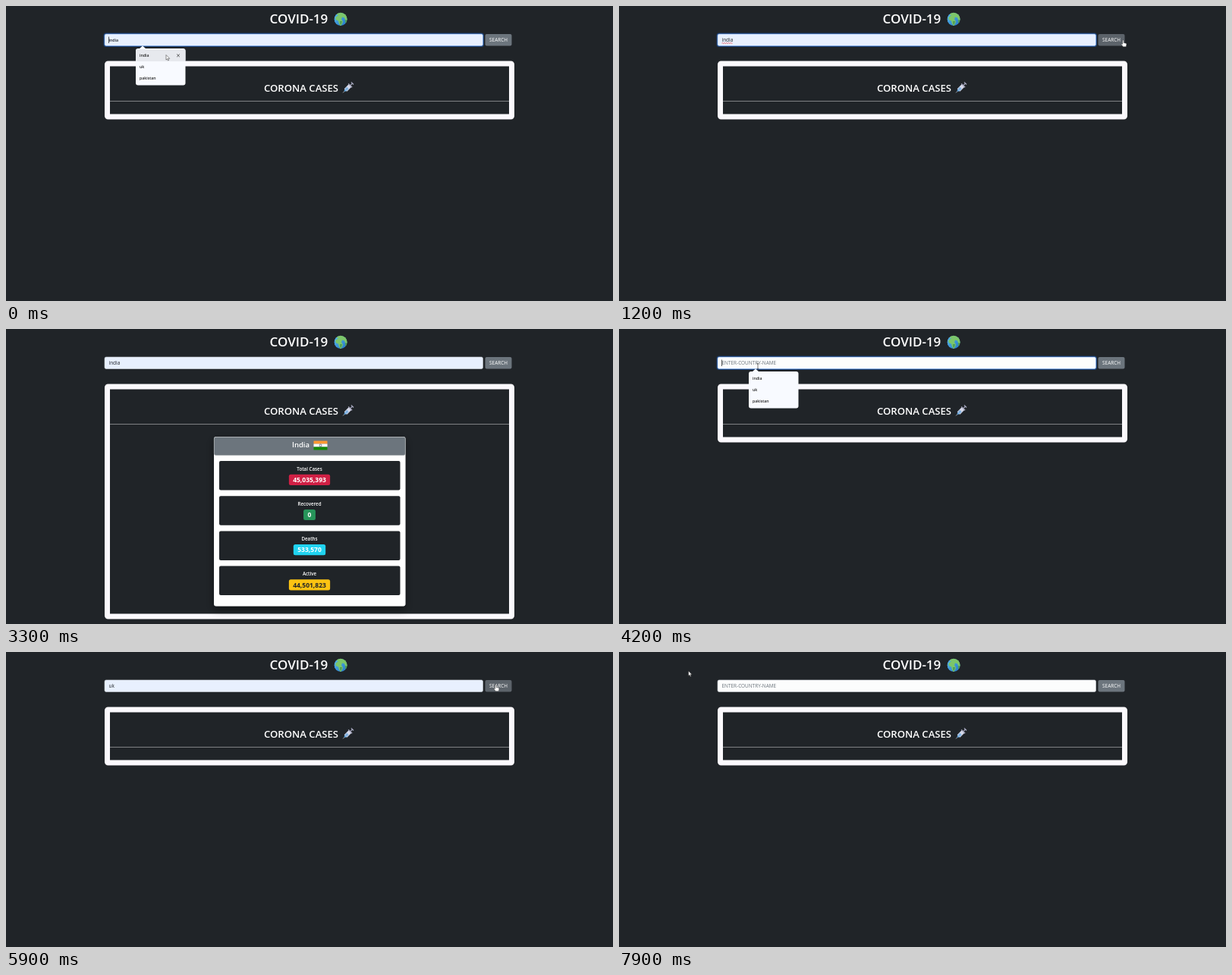
An HTML page for the animation above (8 s loop, 800 px wide and 389 px high).

```html
<!DOCTYPE html>
<html lang="en">
<head>
<meta charset="utf-8">
<title>COVID-19</title>
<style>
  html, body { margin: 0; width: 100%; height: 100%; overflow: hidden; background: #202428; }
  svg { display: block; width: 100%; height: 100%; }
  text { font-family: "Open Sans", "Noto Sans", sans-serif; white-space: pre; }
  .mid { text-anchor: middle; }
  .semi { font-weight: 600; }
  .off { display: none; }
</style>
</head>
<body>
<svg viewBox="0 0 800 389" fill="#fff">
  <defs>
    <filter id="shadow" x="-15%" y="-15%" width="130%" height="130%">
      <feDropShadow dx="0" dy="4" stdDeviation="6" flood-color="#000" flood-opacity=".45"/>
    </filter>
    <linearGradient id="sea" x2="1" y2="1">
      <stop stop-color="#58b8f0"/><stop offset="1" stop-color="#2478c4"/>
    </linearGradient>
    <clipPath id="disc"><circle cx="441" cy="17.3" r="8.6"/></clipPath>
    <clipPath id="jack"><rect width="16.5" height="8.6"/></clipPath>
  </defs>

  <text class="semi" x="347.5" y="23" font-size="17">COVID-19</text>
  <g clip-path="url(#disc)">
    <circle cx="441" cy="17.3" r="8.6" fill="url(#sea)"/>
    <path fill="#7cc66a" d="M436 9l6-1.5 6 2 3 5-1 6-3-2-1-3-3-1-1 3 2 3-1 3-2 3-2-3-1-4-3-1-1-3 2-2 2-1-2-1z"/>
    <path fill="#4d9c57" d="M440 20l3 0-1 4-1.500 1zM447 18l3 1-1 4-2-1z"/>
  </g>

  <rect id="ring" x="128.5" y="35.500" width="501.500" height="18.500" rx="3.500" fill="#1d3f70"/>
  <rect id="field" x="130" y="37" width="498.500" height="15.500" rx="2" stroke-width=".6"/>
  <text id="value" x="135.500" y="47.200"></text>
  <path id="spell" fill="none" stroke="#e33" stroke-width=".7" d="M135.500 49q.7-1.100 1.400 0t1.400 0 1.400 0 1.400 0 1.400 0 1.400 0 1.400 0 1.400 0 1.400 0 1.400 0"/>
  <rect id="caret" x="135" y="40.500" width=".7" height="8.500" fill="#111"/>
  <rect id="button" x="631.500" y="37" width="35" height="15.500" rx="2"/>
  <text class="mid" x="649" y="47.100" font-size="6.400">SEARCH</text>

  <rect id="panel" x="133.500" y="76" width="533" rx="1" fill="none" stroke="#fbf9fd" stroke-width="7"/>
  <text class="semi" x="340" y="112.800" font-size="13.100">CORONA CASES</text>
  <g transform="translate(450.500 108) rotate(-45)">
    <path d="M-9 0H-4" stroke="#a9b6c4" stroke-width=".9"/>
    <path fill="#4f9fe0" d="M-6-1.200h2.500v2.400h-2.500z"/>
    <rect x="-4.500" y="-2.600" width="9" height="5.200" rx="1" fill="#d5d8e8"/>
    <rect x="-4" y="-1.700" width="4" height="3.400" fill="#7fb2e2"/>
    <path stroke="#a8a9c0" stroke-width="1.200" d="M4.500-3.500v7M4.500 0h4M8.500-2.200v4.400"/>
  </g>
  <rect x="137" y="125" width="526" height=".8" fill="#97999b"/>

  <g id="cards"></g>

  <g id="menu">
    <path fill="#f8faff" d="M175.500 56.500l4.500-4 4.500 4z"/>
    <rect x="171" y="56" width="65.500" height="48.500" rx="3" fill="#f8faff"/>
    <rect id="hover" x="171" width="65.500" height="16" rx="2" fill="#e7e9ee"/>
    <path id="cross" stroke="#333" stroke-width=".8" d="M225.200 63.500l3.600 3.600m0-3.600l-3.600 3.600"/>
    <g class="semi" font-size="5.200" fill="#222">
      <text x="176" y="67.300">india</text>
      <text x="176" y="82.300">uk</text>
      <text x="176" y="97.300">pakistan</text>
    </g>
  </g>

  <g id="cursor">
    <path id="arrow" stroke="#222" stroke-width=".5" d="M0 0v6.600l1.500-1.400 1 2.300 1.100-.5-1-2.200h2.100z"/>
    <path id="hand" stroke="#222" stroke-width=".4" d="M-.8.500q.8-1 1.500 0v3l3 .7q.9.400.7 1.500l-.6 3h-4l-2.300-3.200q0-1.100 1.700-.2z"/>
    <path id="beam" fill="none" stroke="#222" stroke-width=".6" d="M-1.300-3.300h2.600M0-3.300v6.600M-1.300 3.300h2.600"/>
  </g>
</svg>

<script>
const $ = id => document.getElementById(id);
const show = (id, on) => $(id).classList.toggle('off', !on);
const set = (id, attrs) => { for (const k in attrs) $(id).setAttribute(k, attrs[k]); };

const flags = {
  India: `<g transform="translate(405.5 147.5)">
    <rect width="18" height="4" fill="#f93"/><rect y="4" width="18" height="4"/>
    <rect y="8" width="18" height="4" fill="#138808"/>
    <circle cx="9" cy="6" r="1.500" fill="none" stroke="#225" stroke-width=".6"/></g>`,
  UK: `<g transform="translate(401.3 149.2)" clip-path="url(#jack)">
    <rect width="16.500" height="8.600" fill="#1c2f73"/>
    <path stroke="#fff" stroke-width="1.700" d="M0 0l16.500 8.600M16.500 0L0 8.600"/>
    <path stroke="#cf1b38" stroke-width=".6" d="M0 0l16.500 8.600M16.500 0L0 8.600"/>
    <path stroke="#fff" stroke-width="2.900" d="M8.250 0v8.600M0 4.300h16.500"/>
    <path stroke="#cf1b38" stroke-width="1.700" d="M8.250 0v8.600M0 4.300h16.500"/></g>`
};
const labels = ['Total Cases', 'Recovered', 'Deaths', 'Active'];
const tints = ['#d02045', '#27945a', '#20d3f0', '#fcc312'];

function row(value, i, lift) {
  const y = 174 + i * 46.2 - lift;
  const width = 11 + value.replace(/,/g, '').length * 4.86 + value.split(',').length * 2.2 - 2.2;
  return `<rect x="281" y="${y}" width="238.500" height="38.500" rx="2" fill="#202428"/>
    <text class="mid semi" x="400" y="${y + 12.7}" font-size="6.200">${labels[i]}</text>
    <rect x="${400 - width / 2}" y="${y + 17.7}" width="${width}" height="14.200" rx="2.500" fill="${tints[i]}"/>
    <text class="mid" x="400" y="${y + 27.9}" font-size="8.500" font-weight="700"
      fill="${i == 3 ? '#202428' : '#fff'}">${value}</text>`;
}

function card(name, titleX, lift, values) {
  return `<g id="${name}">
    <rect x="274" y="142" width="252.500" height="${223.5 - lift}" rx="3" filter="url(#shadow)"/>
    <rect x="274.300" y="142.500" width="252" height="${24 - lift}" rx="2.500" fill="#6c757d" stroke="#a4a9ae" stroke-width=".6"/>
    <text class="semi" x="${titleX}" y="156.200" font-size="9.500">${name}</text>${flags[name]}
    ${values.map((v, i) => row(v, i, lift)).join('')}</g>`;
}

$('cards').innerHTML =
  card('India', 377, 0, ['45,035,393', '0', '533,570', '44,501,823']) +
  card('UK', 382, 1.2, ['24,910,387', '24,678,275', '232,112', '0']);

// Pointer path: time, x, y
const path = [
  [0, 211, 64.5], [200, 650, 104], [400, 650, 104], [700, 701, 130], [1200, 664.5, 45],
  [1300, 650, 44], [2900, 650, 44], [3200, 135, 22], [3500, 112, 22], [3900, 183, 49],
  [4300, 183, 49], [4500, 188, 80], [4800, 188, 80], [5200, 600, 66], [5600, 645.5, 43],
  [6100, 645.5, 43], [6200, 651, 44], [6500, 651, 44], [7000, 103, 3], [7700, 44, 1],
  [7900, 91.5, 25], [8000, 91.5, 25]
];

function pointer(t) {
  const i = path.findIndex(p => p[0] > t);
  const [a, b] = [path[i - 1], path[i]];
  const k = (t - a[0]) / (b[0] - a[0]);
  return [1, 2].map(j => a[j] + (b[j] - a[j]) * k);
}

function draw(t) {
  const during = (a, b) => t >= a && t < b;
  const open = t < 100 || during(4100, 4800);
  const focus = t < 1300 || during(4100, 5700);
  const value = t < 3500 ? 'india' : during(4500, 7700) ? 'uk' : '';
  const india = during(1500, 3500), uk = during(6000, 7700);

  const [x, y] = pointer(t);
  const away = during(3300, 3500) || during(7100, 7700);
  const inBar = !away && y >= 37 && y <= 52.5;
  const onButton = inBar && x >= 631.5 && x <= 666.5;
  const inField = inBar && x >= 130 && x <= 628.5;
  const item = open && y > 57 ? Math.floor((y - 57) / 15.2) : -1;

  show('ring', focus);
  set('field', { fill: value ? '#e8f0fe' : '#fcfdfd', stroke: focus ? '#86b7fe' : '#ced4da' });
  $('value').textContent = value || 'ENTER-COUNTRY-NAME';
  set('value', {
    fill: value ? '#212529' : '#6c757d',
    'font-size': value && open ? 5.3 : 6.45,
    'font-weight': value && open ? 600 : 400
  });
  show('spell', value == 'india' && focus && !open);
  show('caret', open);
  set('button', { fill: onButton ? '#5c636a' : '#6c757d' });

  set('panel', { height: india ? 303 : uk ? 301.8 : 70 });
  show('India', india);
  show('UK', uk);

  show('menu', open);
  show('hover', item >= 0);
  show('cross', item == 0);
  set('hover', { y: 57 + Math.max(item, 0) * 15.2 });

  show('cursor', !away);
  show('hand', onButton);
  show('beam', inField);
  show('arrow', !onButton && !inField);
  set('cursor', { transform: `translate(${x} ${y})` });
}

// The screen updates ten times a second
const start = performance.now();
function tick() {
  draw(Math.floor((performance.now() - start) % 8000 / 100) * 100);
  requestAnimationFrame(tick);
}
tick();
</script>
</body>
</html>
```
